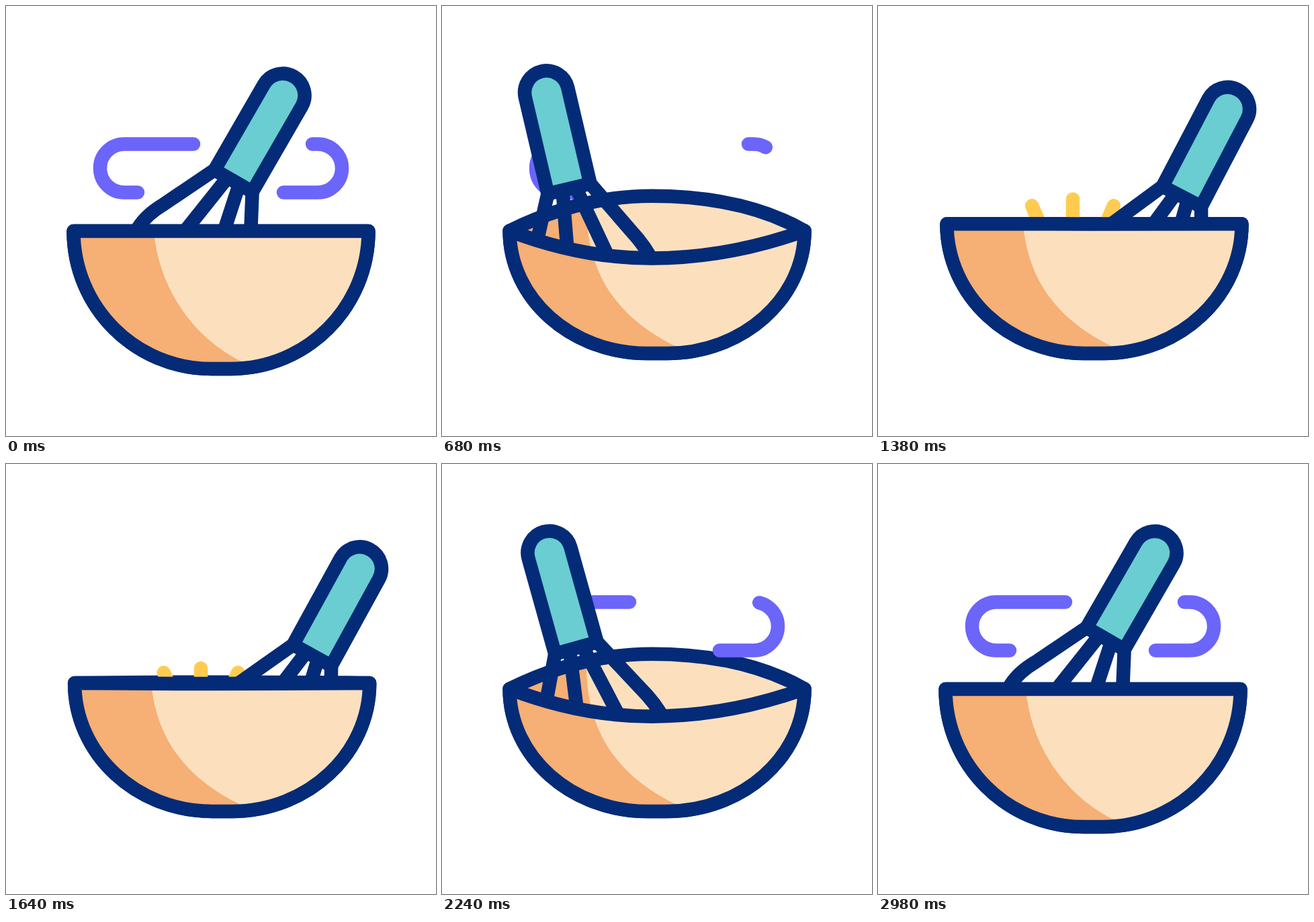
These frames come from a looping animation (640x640 px, 3.04 s). An HTML page:

```html
<!DOCTYPE html>
<html lang="en">
<head>
<meta charset="utf-8">
<title>Whisk and bowl</title>
<style>
  html, body { margin: 0; width: 100%; height: 100%; overflow: hidden; background: #fff; }
  svg { display: block; width: 100%; height: 100%; }
  .line { fill: none; stroke: #042b77; stroke-width: 20.5; stroke-linecap: round; stroke-linejoin: round; }
  .swirl { fill: none; stroke: #6b65fa; stroke-width: 20.5; stroke-linecap: round; }
  .spark { stroke: #ffcc50; stroke-width: 20.5; stroke-linecap: round; }
  .cream { fill: #fce0be; }
  .shade { fill: #f6af74; }
</style>
</head>
<body>
<svg viewBox="0 0 640 640">
  <defs>
    <clipPath id="clipAll"><path class="all"/></clipPath>
    <clipPath id="clipFront"><path class="front"/></clipPath>
  </defs>
  <path class="cream all"/>
  <g clip-path="url(#clipAll)"><path class="shade"/></g>
  <path class="line all"/>
  <path class="swirl" id="swirlRight" d="M413 277.5H464A36 36 0 0 0 464 205.5H456"/>
  <path class="swirl" id="swirlLeft" d="M279 205.5H176A36 36 0 0 0 176 277.5H196"/>
  <g id="sparks"><line class="spark"/><line class="spark"/><line class="spark"/></g>
  <g id="whisk">
    <path class="line" d="M-32.5 147L-73 230Q-87 255 -88 278M32.5 147L75 228Q92 258 97 283
      M-10 147L-27 260M10 147L34 260"/>
    <path class="line" style="fill:#69cdd1" d="M-32.5 147V0A32.5 32.5 0 0 1 32.5 0V147Z"/>
  </g>
  <path class="cream front"/>
  <g clip-path="url(#clipFront)"><path class="shade"/></g>
  <path class="line front"/>
</svg>
<script>
const LOOP = 3040;

const byId = id => document.getElementById(id);
const setPath = (selector, d) => document.querySelectorAll(selector).forEach(el => el.setAttribute('d', d));
const progress = (t, from, to) => Math.min(1, Math.max(0, (t - from) / (to - from)));
const ease = (t, from, to) => (1 - Math.cos(Math.PI * progress(t, from, to))) / 2;
const bump = (t, center, width) => Math.exp(-(((t - center) / width) ** 2));

// Swings from rest to the left, across to the right, back to the left and to rest.
const swing = (t, [start, left1, right, left2, end], rest, low, high) =>
  rest + (low - rest) * (ease(t, start, left1) - ease(t, left2, end))
    + (high - low) * (ease(t, left1, right) - ease(t, right, left2));

function drawWhisk(t) {
  const x = swing(t, [265, 599, 1530, 2330, 2980], 412, 148, 545);
  const y = 133 + 33 * bump(t, 1520, 200) - 17 * bump(t, 550, 110) - 19 * bump(t, 2600, 200);
  const tilt = swing(t, [300, 760, 1520, 2310, 2950], 30, -16.5, 31.5);
  byId('whisk').setAttribute('transform', `translate(${x} ${y}) rotate(${tilt})`);
}

function drawBowl(t) {
  const lean = ease(t, 220, 700) - ease(t, 2250, 2880);
  const open = ease(t, 220, 700) - ease(t, 850, 1400) + ease(t, 1600, 2003) - ease(t, 2270, 2860);
  const raise = bump(t, 1450, 425);
  const y = 335 - 11 * raise, bottom = 540 - 23 * lean;
  const left = 100.5 + 2 * raise, right = 539.5 + 2 * raise, mid = 312;
  const rx = 205, kx = 0.448 * rx, ky = 0.448 * (bottom - y);

  const body = `C${right} ${bottom - ky} ${right - kx} ${bottom} ${right - rx} ${bottom}`
    + `H${left + rx}C${left + kx} ${bottom} ${left} ${bottom - ky} ${left} ${y}Z`;
  const rim = (depth, reach) => `M${left} ${y}Q${(left + mid) / 2} ${y + depth} ${mid} ${y + depth}`
    + `Q${mid + reach * (right - mid)} ${y + depth} ${right} ${y}`;
  setPath('.all', rim(-52 * open, 0.6) + body);
  setPath('.front', rim(41 * open, 0.5) + body);

  setPath('.shade', `M80 260H${220 - 5 * lean}V${335 - 45 * lean}C${228 - 16 * lean} ${425 - 20 * lean} `
    + `${283 - 14 * lean} ${497 - 28 * lean} ${354 - 3 * lean} ${bottom - 9}V560H80Z`);
}

const swirls = [
  { el: byId('swirlRight'), hide: [200, 770], show: [1711, 2297] },
  { el: byId('swirlLeft'), hide: [380, 950], show: [2000, 2700] },
].map(s => ({ ...s, length: s.el.getTotalLength() }));

function drawSwirls(t) {
  const leaving = t < LOOP / 2;
  for (const { el, hide, show, length } of swirls) {
    const start = leaving ? length * progress(t, ...hide) : 0;
    const end = leaving ? length : length * progress(t, ...show);
    el.style.display = end - start > 0.1 ? '' : 'none';
    el.setAttribute('stroke-dasharray', `${end - start} ${2 * length}`);
    el.setAttribute('stroke-dashoffset', -start);
  }
}

function drawSparks(t) {
  const growth = 1.75 * (ease(t, 1240, 1500) - ease(t, 1500, 1740));
  const group = byId('sparks');
  group.style.display = growth > 0.01 ? '' : 'none';
  [...group.children].forEach((spark, i) => {
    const side = i - 1, x = 290 + 45 * side, y = 334;
    const ends = { x1: x, y1: y, x2: x + 16 * side * growth, y2: y - (47 - 10 * Math.abs(side)) * growth };
    for (const name in ends) spark.setAttribute(name, ends[name]);
  });
}

const began = performance.now();
function tick() {
  const t = (performance.now() - began) % LOOP;
  drawBowl(t);
  drawSwirls(t);
  drawSparks(t);
  drawWhisk(t);
  requestAnimationFrame(tick);
}
tick();
</script>
</body>
</html>
```
